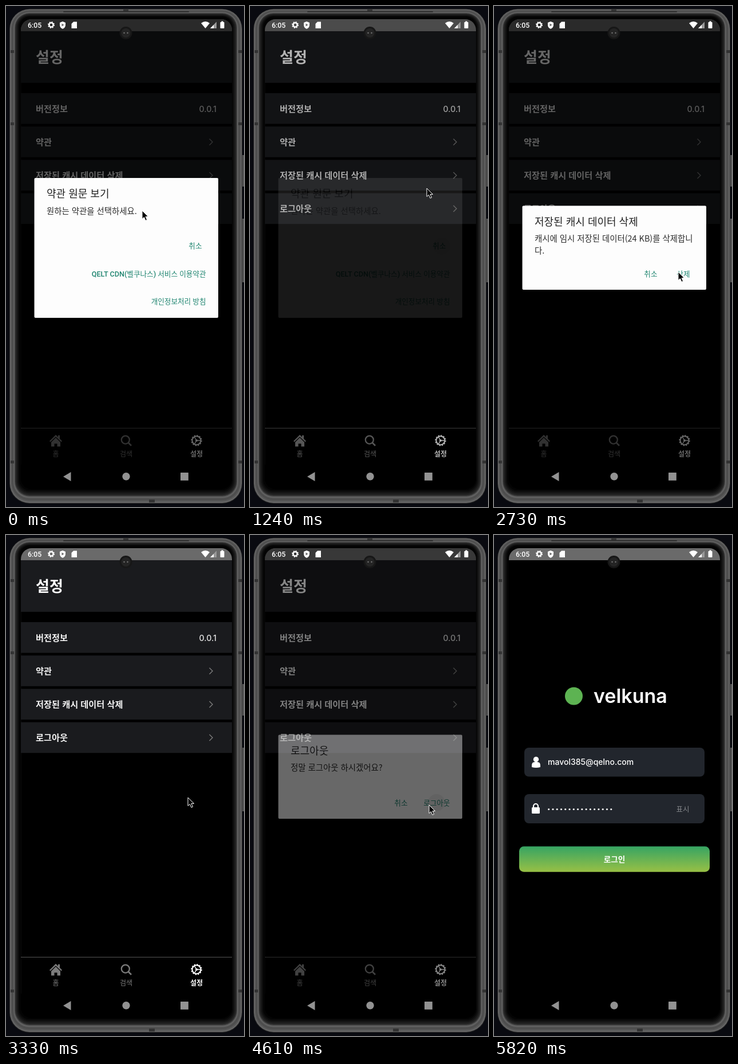
An HTML page that plays this animation: 416 by 874 pixels, repeating every 6000 ms.

```html
<!DOCTYPE html>
<html lang="ko">
<head>
<meta charset="utf-8">
<style>
html, body { margin: 0; width: 100%; height: 100%; overflow: hidden; background: #090a10; }
svg { display: block; width: 416px; height: 874px; }
text { font-family: Roboto, "Noto Sans CJK KR", "Noto Sans CJK", sans-serif; white-space: pre; }
.k { font-family: "Noto Sans CJK KR", "Noto Sans CJK", sans-serif; }
.i { font-family: Inter, sans-serif; }
.b { font-weight: 600; }
.m { font-weight: 500; }
.e { text-anchor: end; }
.c { text-anchor: middle; }
</style>
</head>
<body>
<svg id="stage" viewBox="0 0 416 874"></svg>
<script>
const text = (x, y, size, str, fill = '#fff', cls = '') =>
  `<text x="${x}" y="${y}" font-size="${size}" fill="${fill}" class="${cls}">${str}</text>`;
const rect = (x, y, w, h, fill, r = 0, extra = '') =>
  `<rect x="${x}" y="${y}" width="${w}" height="${h}" rx="${r}" fill="${fill}" ${extra}/>`;
const circle = (x, y, r, fill, extra = '') =>
  `<circle cx="${x}" cy="${y}" r="${r}" fill="${fill}" ${extra}/>`;
const path = (d, fill, extra = '') => `<path d="${d}" fill="${fill}" ${extra}/>`;
const line = (d, color, w) => path(d, 'none', `stroke="${color}" stroke-width="${w}"`);
const group = (id, body, extra = '') => `<g id="${id}" ${extra}>${body}</g>`;

const PANEL = '#1a1b1e', GREY = '#7b7b7b', NAV = '#929292', TEAL = '#1f8570';

// Phone body: nested rounded rectangles [inset, colour]; the bottom bezel is deeper than the top
function phone() {
  const rings = [[0, '#2a2a2a'], [1, '#707070'], [2, '#5a5a5a'], [4, '#4e4e4e'], [7, '#606060'],
    [9, '#444'], [10, '#303030'], [11, '#222'], [13, '#161616'], [15, '#0c0c0c'], [17, '#040404']];
  const body = rings.map(([d, f]) => rect(6 + d, 5 + d * .8, 407 - 2 * d, 863 - d * 2.15, f, 35 - d)).join('');
  const bands = [79, 205, 795].map(y => rect(8, y - 2, 6, 5, '#333') + rect(406, y - 2, 6, 5, '#333')).join('');
  return rect(413, 260, 3, 55, '#555') + rect(413, 371, 3, 111, '#555') + body + bands +
    rect(205, 6, 9, 4, '#333') + rect(250, 861, 10, 5, '#333') + rect(100, 9, 220, 2, '#303030', 1);
}

// Ring with n teeth; r is the outer radius
function gear(x, y, r, n, width) {
  const tooth = r - 1, dash = Math.PI * tooth / n;
  return circle(x, y, tooth, 'none', `stroke="#fff" stroke-width="2" stroke-dasharray="${dash}"`) +
    circle(x, y, r - 1.2 - width / 2, 'none', `stroke="#fff" stroke-width="${width}"`);
}

function row(i, label) {
  const y = 152 + i * 58.2;
  const end = i ? line(`M355.5 ${y + 21.5}l5.5 5.5-5.5 5.5`, GREY, 1.4)
    : text(368, y + 32.5, 14.2, '0.0.1', '#e4e4e4', 'i e m');
  return group('row' + i, rect(26, y, 369, 53.6, PANEL) + text(52, y + 32.5, 15.2, label, '#f4f4f4', 'k b') + end);
}

function settings() {
  const home = path('M76 759L87 748l4 4v-3h3v6l4 4-1.5 1.5L87 751.5l-9.5 9zM79 761l8-8 8 8v7.5h-5.5v-5h-5v5H79z', GREY);
  const search = circle(208.8, 756.8, 7, 'none', `stroke="${GREY}" stroke-width="2.3"`) + line('M214 762l5 5', GREY, 2.6);
  return rect(26, 44, 369, 756, '#000') + rect(25.5, 44, 1, 756, '#141414') +
    rect(26, 44, 369, 90, PANEL) + text(52, 98.5, 26, '설정', '#fff', 'k b') +
    ['버전정보', '약관', '저장된 캐시 데이터 삭제', '로그아웃'].map((s, i) => row(i, s)).join('') +
    rect(26, 736, 369, 1, '#555') + home + search +
    gear(333, 758, 9.7, 12, 2) + circle(333, 758, 2, '#fff') + line('M333 758l-3.5-6m3.5 6h7m-7 0l-3.5 6', '#fff', 1.4) +
    text(87, 786, 12, '홈', GREY, 'k c') + text(210, 786, 12, '검색', GREY, 'k c') + text(333, 786, 12, '설정', '#fff', 'k c b');
}

function login() {
  const dots = Array.from({ length: 16 }, (_, i) => circle(95.7 + i * 7.27, 478.5, 1.6, '#f4f4f4')).join('');
  return circle(139.5, 281, 15.5, '#5db352') + text(174, 293, 34, 'velkuna', '#fff', 'i b') +
    rect(53, 371, 315, 50.5, '#22262d', 8) + rect(53, 452, 315, 51, '#22262d', 8) +
    circle(73.5, 391.5, 4.7, '#fff') + path('M66 405v-3q0-6 5-6h5q5 0 5 6v3q-7.5 2-15 0z', '#fff') +
    rect(66, 475, 14, 11, '#fff', 1.5) + line('M69 476v-3a4 4 0 0 1 8 0v3', '#fff', 2.2) +
    text(94, 401, 14, 'mavol385@qelno.com', '#fff', 'i m') + dots +
    text(318.5, 482.5, 12.5, '표시', '#85878b', 'k') +
    rect(44, 543.3, 333, 44.4, 'url(#green)', 8) + text(210.5, 571, 13.6, '로그인', '#fff', 'k b c');
}

function dialog(id, y, h, title, lines, buttons, press) {
  return group(id, rect(49.5, y, 321.5, h, '#fdfdfd', 2) + text(71, y + 34, 18, title, '#212121', 'k') +
    lines.map((s, i) => text(71, y + 62.5 + i * 21, 14.4, s, '#2b2b2b', 'k')).join('') +
    circle(...press, 15, '#000', 'class="ripple" opacity="0"') +
    buttons.map(([x, by, s]) => text(x, by, 12.6, s, TEAL, 'e m')).join(''));
}

function systemIcons() {
  return text(38, 38, 12.3, '6:05', '#fff', 'm') +
    gear(79, 33, 6, 8, 2.4) +
    path('M99 27l5 2v4q0 5-5 7-5-2-5-7v-4z', '#fff') + path('M97.5 30.5l4 2.5-4 2.5z', '#666') +
    path('M118 27.5h6v11.5h-9.5V31z', '#fff') +
    path('M341 30q7.5-6 15 0l-7.5 9z', '#fff') +
    path('M368 27.5V39h-11z', '#999') + path('M363 33v6h-6z', '#fff') +
    rect(374.5, 28, 7, 11, '#fff', 1) + rect(376.5, 26.5, 3, 2, '#fff') +
    path('M100 821l13.5-8v16z', NAV) + circle(210, 820.8, 6.7, NAV) + rect(305, 814, 13.8, 13.8, NAV, .5);
}

const stage = document.getElementById('stage');
stage.innerHTML = `<defs>
  <linearGradient id="green" x2="0" y2="1"><stop stop-color="#36a463"/><stop offset="1" stop-color="#98c045"/></linearGradient>
  <clipPath id="screen">${rect(26, 23, 369, 820, '#000', 19)}</clipPath>
  <clipPath id="page">${rect(26, 44, 369, 799, '#000')}</clipPath></defs>` +
  phone() +
  group('view', rect(26, 23, 369, 820, '#000') + rect(26, 23, 369, 21, '#6a6a6a') +
    group('pages', group('login', login()) + group('settings', settings()), 'clip-path="url(#page)"') +
    rect(26, 23, 369, 820, '#000', 0, 'id="dim"') +
    dialog('terms', 300, 244, '약관 원문 보기', ['원하는 약관을 선택하세요.'],
      [[342.5, 422.5, '취소'], [349.5, 471.5, 'QELT CDN(벨쿠나스) 서비스 이용약관'], [349.5, 520, '개인정보처리 방침']], [335, 419]) +
    dialog('cache', 348.5, 146.5, '저장된 캐시 데이터 삭제', ['캐시에 임시 저장된 데이터(24 KB)를 삭제합니', '다.'],
      [[285.5, 471.5, '취소'], [342.5, 471.5, '삭제']], [331, 467]) +
    dialog('logout', 348.5, 146.5, '로그아웃', ['정말 로그아웃 하시겠어요?'],
      [[275.5, 471.5, '취소'], [349.5, 471.5, '로그아웃']], [326, 467]) +
    systemIcons() +
    circle(209.5, 47, 11, '#171717') + circle(209.5, 47, 8, '#242424') +
    circle(206.5, 47, 1.2, '#777') + circle(212.5, 47, 1.2, '#777') +
    path('M0 0V14.5L3.4 11.5 5.9 17.3 8.5 16.2 6 10.5H10.5Z', '#000', 'id="cursor" stroke="#fff" stroke-width="1"'),
    'clip-path="url(#screen)"');

const $ = id => document.getElementById(id);
const clamp = x => Math.max(0, Math.min(1, x));
const smooth = x => (x = clamp(x), x * x * (3 - 2 * x));

// [dialog, opens, closes] and [row, pressed]
const dialogs = [['terms', -999, 1105], ['cache', 1880, 2930], ['logout', 3800, 4523]];
const presses = [['row2', 1880], ['row3', 3770]];
// [time, x, y] of the pointer tip
const track = [[0, 238, 357], [850, 331, 414], [1100, 331, 414], [1240, 309, 318], [1720, 229, 292],
  [1990, 229, 292], [2720, 322, 464], [3000, 322, 464], [3330, 318, 458], [3670, 252, 350],
  [3830, 252, 350], [4360, 313, 471], [5010, 313, 471], [5580, 398, 610]];

function pointer(t) {
  const i = track.findIndex(k => k[0] > t);
  if (i < 0) return track[track.length - 1].slice(1);
  const [a, b] = [track[i - 1], track[i]];
  const p = smooth((t - a[0]) / (b[0] - a[0]));
  return [a[1] + (b[1] - a[1]) * p, a[2] + (b[2] - a[2]) * p];
}

function draw(t) {
  let dim = 0;
  for (const [id, open, close] of dialogs) {
    const node = $(id);
    node.setAttribute('opacity', clamp((t - open) / 180) * (1 - clamp((t - close) / 150)));
    node.querySelector('.ripple').setAttribute('opacity', .06 * clamp((t - close + 120) / 120));
    dim += .6 * smooth((t - open) / 260) * (1 - smooth((t - close - 20) / 230));
  }
  $('dim').setAttribute('opacity', dim);

  for (const [id, at] of presses) {
    const pressed = smooth((t - at) / 90) * (1 - smooth((t - at - 110) / 250));
    $(id).setAttribute('opacity', 1 - .78 * pressed);
  }

  // The settings page slides out while the login page follows at a third of its pace
  const left = t < 4624 ? 1 : Math.exp((4624 - t) / 104);
  $('settings').setAttribute('transform', `translate(${t > 5400 ? 400 : 369 * (1 - left)} 0)`);
  $('login').setAttribute('transform', `translate(${-110.7 * left} 0)`);

  $('cursor').setAttribute('transform', `translate(${pointer(t)})`);
  $('cursor').setAttribute('visibility', t < 5580 ? 'visible' : 'hidden');
}

const start = performance.now();
function tick() {
  draw((performance.now() - start) % 6000);
  requestAnimationFrame(tick);
}
tick();
</script>
</body>
</html>
```
